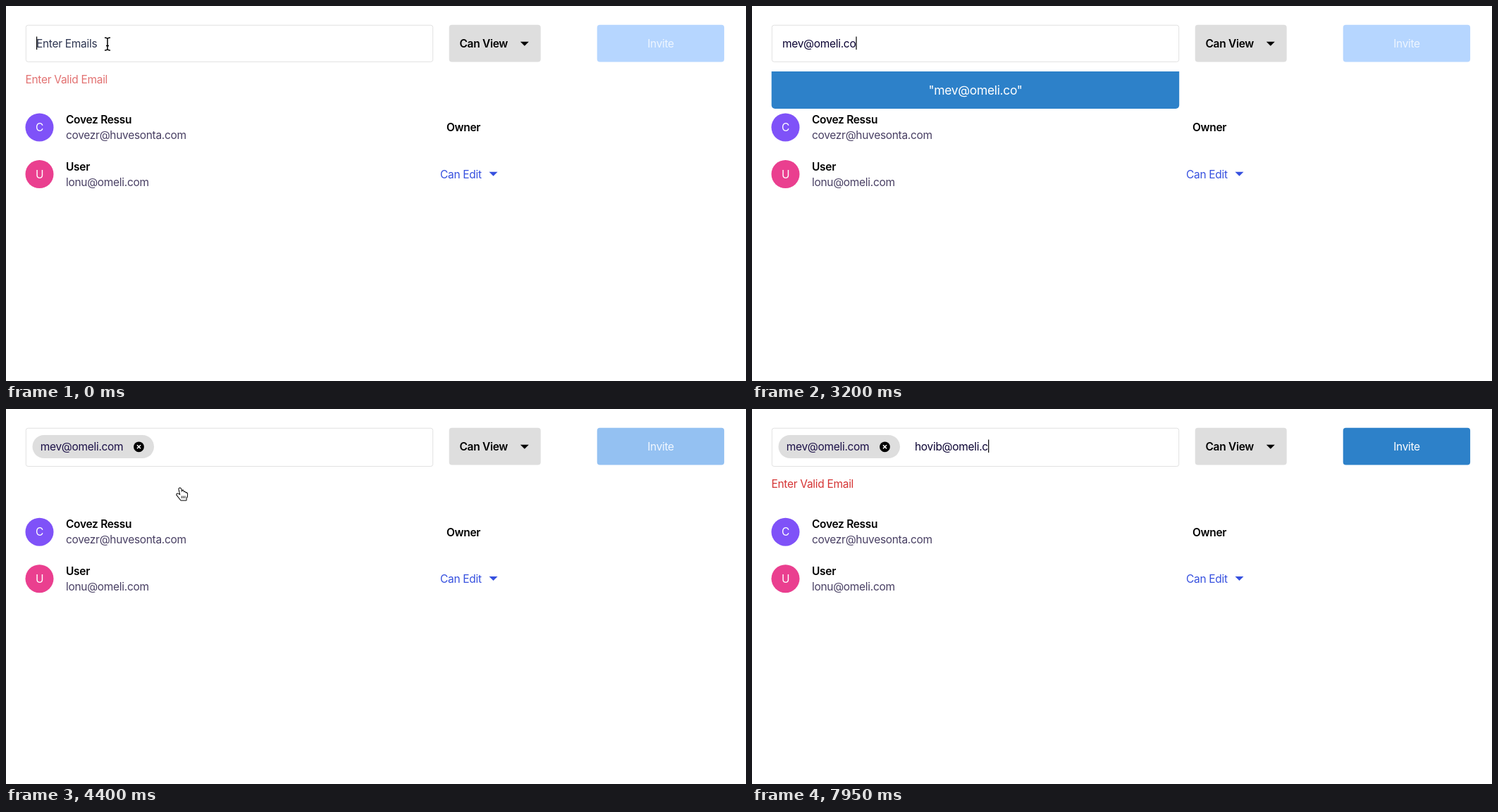
Recreate the animation shown at these times as an HTML page with a canvas. Size 1050x533 px, loop 8 s.

```html
<!DOCTYPE html>
<html lang="en">
<head>
<meta charset="utf-8">
<title>Invite members</title>
<style>
  html, body { margin: 0; width: 100%; height: 100%; overflow: hidden; background: #fff; }
  canvas { display: block; width: 1050px; height: 533px; }
</style>
</head>
<body>
<canvas id="stage"></canvas>
<script>
const W = 1050, H = 533, LOOP = 8000, STEP = 50;
const canvas = document.getElementById('stage');
const ctx = canvas.getContext('2d');
const ratio = window.devicePixelRatio || 1;
canvas.width = W * ratio;
canvas.height = H * ratio;

const FIRST = 'mev@omeli.com', SECOND = 'hovib@omeli.com';
const FIRST_KEYS = [450, 650, 800, 1500, 2000, 2050, 2300, 2450, 2600, 2850, 3100, 3200, 3500];
const SECOND_KEYS = [5350, 5550, 5600, 6000, 6150, 6550, 6650, 7150, 7350, 7500, 7600, 7750, 7950];
const PICK = 4400;   // suggestion becomes a chip
const FOCUS = 4800;  // field is clicked again

// time, x, y of the pointer's hot spot
const PATH = [
  [3850, 150, 56], [3900, 172, 66], [3950, 206, 79], [4000, 230, 91.5],
  [4050, 239, 102], [4100, 244, 109], [4200, 247, 112.5], [4400, 247, 112.5],
  [4500, 256, 103], [4600, 270, 84], [4700, 282, 67], [4800, 288, 59], [4850, 288.5, 58]
];

const ramp = (t, from, to) => t <= from ? 0 : t >= to ? 1 : (t - from) / (to - from);
const mix = (a, b, k) => `rgb(${a.map((v, i) => Math.round(v + (b[i] - v) * k))})`;

function setFont(size, weight) {
  ctx.font = `${weight} ${size}px Inter, "Noto Sans", sans-serif`;
  ctx.letterSpacing = `${-size * 0.0195}px`;
}

// y is the middle of the capitals
function text(str, x, y, color, { size = 15.5, weight = 400, align = 'left' } = {}) {
  setFont(size, weight);
  ctx.textAlign = align;
  ctx.fillStyle = color;
  ctx.fillText(str, x, y + size * 0.36);
}

function textWidth(str) {
  setFont(15.5, 400);
  return ctx.measureText(str).width;
}

function box(x, y, w, h, r, fill, stroke) {
  ctx.beginPath();
  ctx.roundRect(x, y, w, h, r);
  if (fill) { ctx.fillStyle = fill; ctx.fill(); }
  if (stroke) { ctx.strokeStyle = stroke; ctx.lineWidth = 1; ctx.stroke(); }
}

function disc(x, y, r, color) {
  ctx.beginPath();
  ctx.arc(x, y, r, 0, Math.PI * 2);
  ctx.fillStyle = color;
  ctx.fill();
}

function triangle(x, y, color) {
  ctx.beginPath();
  ctx.moveTo(x - 6, y);
  ctx.lineTo(x + 6, y);
  ctx.lineTo(x, y + 6);
  ctx.fillStyle = color;
  ctx.fill();
}

function member(y, name, email, color) {
  disc(47.5, y, 20, color);
  text(name[0], 47.5, y, '#fff', { align: 'center' });
  text(name, 85, y - 11, '#000', { weight: 600 });
  text(email, 85, y + 11, '#483f63');
}

function caret(x, alpha) {
  ctx.globalAlpha = alpha;
  ctx.fillStyle = '#000';
  ctx.fillRect(x, 43.5, 1.2, 18.5);
  ctx.globalAlpha = 1;
}

function outlined(path, fill, edge, width) {
  ctx.lineJoin = 'round';
  ctx.strokeStyle = edge;
  ctx.lineWidth = width;
  ctx.stroke(path);
  ctx.fillStyle = fill;
  ctx.fill(path);
}

const ARROW = new Path2D('M0 0V15.5L3.6 12.2L6.1 18L8.8 16.8L6.3 11.2H11.2Z');
const HAND = new Path2D('M-1.6 1Q-.2-.8 1.2 1L2.7 6Q4-.0 5.2 6Q7 4.3 7.9 6.9Q10 5.9 10.2 8.6' +
  'Q10.4 12.5 8.6 14.6V17H1.2L-4.6 9.6Q-5 7.2-2.4 8.3L.4 10Z');
const BEAM = new Path2D('M-4-9Q-.8-9 0-7.2Q.8-9 4-9M0-7.2V7.2M-4 9Q-.8 9 0 7.2Q.8 9 4 9M-2 2.6H2');

function pointer(kind, x, y, alpha = 1) {
  ctx.save();
  ctx.translate(x, y);
  ctx.globalAlpha = alpha;
  if (kind === 'arrow') outlined(ARROW, '#000', '#fff', 2.2);
  else if (kind === 'hand') {
    outlined(HAND, '#fff', '#000', 2);
    ctx.lineWidth = 0.9;
    ctx.strokeStyle = '#000';
    ctx.stroke(new Path2D('M2.6 11V14.4M4.8 11V14.4M7 11V14.4'));
  } else {
    ctx.strokeStyle = '#fff';
    ctx.lineWidth = 3;
    ctx.stroke(BEAM);
    ctx.strokeStyle = '#000';
    ctx.lineWidth = 1.5;
    ctx.stroke(BEAM);
  }
  ctx.restore();
}

function along(path, t) {
  const i = path.findIndex(p => p[0] > t);
  if (i < 0) return path[path.length - 1].slice(1);
  const [a, b] = [path[i - 1], path[i]];
  const k = ramp(t, a[0], b[0]);
  return [a[1] + (b[1] - a[1]) * k, a[2] + (b[2] - a[2]) * k];
}

function drawPointer(t) {
  if (t < 450) return pointer('beam', 144, 54);
  if (t < PATH[0][0] || t >= 5350) return;
  const [x, y] = along(PATH, t);
  const fieldEnd = t < PICK ? 80 : 82;
  if (y < fieldEnd) pointer('beam', x, y, t < 5300 ? 1 : 0.17);
  else if (t <= PICK && y > 93) pointer('hand', x, y);
  else pointer('arrow', x, y);
}

function drawField(t, picked) {
  box(28.3, 27.3, 577.4, picked ? 54.2 : 52, 3, '#fff', '#e1e1e1');
  const typedBy = keys => keys.filter(k => k <= t).length;
  const ink = '#0b0333';
  if (!picked) {
    const typed = FIRST.slice(0, typedBy(FIRST_KEYS));
    if (typed) text(typed, 43, 53.3, ink);
    else text('Enter Emails', 43, 53.3, '#2d3550');
    const off = (t >= 1400 && t < 1500) || t >= 3950;
    if (!off) caret(43 + textWidth(typed), 1);
    return;
  }
  box(37.5, 37, 172.5, 33, 16.5, '#dedede');
  text(FIRST, 48.7, 53.3, '#1c1148');
  disc(188.5, 53.8, 7.4, '#000');
  ctx.strokeStyle = '#fff';
  ctx.lineWidth = 1.6;
  ctx.stroke(new Path2D('M186 51.3L191 56.3M191 51.3L186 56.3'));
  const typed = SECOND.slice(0, typedBy(SECOND_KEYS));
  if (typed) text(typed, 231, 53.3, ink);
  if (t >= FOCUS) caret(231.2 + textWidth(typed), t >= 5300 && t < 5350 ? 0.15 : 1);
}

function drawSuggestion(t) {
  const typed = FIRST.slice(0, t < 3500 ? -1 : undefined);
  const fill = mix([45, 129, 201], [61, 118, 183], ramp(t, 4000, 4200));
  box(27.7, 93, 578.5, 53, [0, 0, 5, 5], fill);
  text(`"${typed}"`, 317, 119.8, '#fff', { size: 17.5, align: 'center' });
}

function drawError(t, y) {
  const alpha = t < PICK ? 0.7 + 0.3 * ramp(t, 0, 100) : ramp(t, FOCUS - 50, FOCUS + 150);
  ctx.globalAlpha = alpha;
  text('Enter Valid Email', 27.5, y, '#d53434');
  ctx.globalAlpha = 1;
}

function draw(t) {
  const picked = t >= PICK;
  const shift = picked ? 2.2 : 0;
  ctx.setTransform(ratio, 0, 0, ratio, 0, 0);
  ctx.fillStyle = '#fff';
  ctx.fillRect(0, 0, W, H);

  drawField(t, picked);
  box(628.7, 26.8, 130, 52.6, 4, '#dedede');
  text('Can View', 643.5, 53.3, '#000', { weight: 600 });
  triangle(735.8, 50.7, '#000');

  const active = ramp(t, PICK - 50, PICK + 150);
  box(838.7, 26.8, 180.4, 52.8, 4, mix([182, 214, 255], [45, 129, 201], active));
  text('Invite', 929, 53.3, mix([238, 246, 255], [255, 255, 255], active), { align: 'center' });

  member(172.5 + shift, 'Covez Ressu', 'covezr@huvesonta.com', '#7f52f8');
  member(239 + shift, 'User', 'lonu@omeli.com', '#ea3f8f');
  text('Owner', 625, 172.8 + shift, '#000', { weight: 600 });
  text('Can Edit', 616, 239.2 + shift, '#3650df');
  triangle(691.5, 235.7 + shift, '#3650df');

  if (t >= 3200 && !picked) drawSuggestion(t);
  else drawError(t, 104 + shift);
  drawPointer(t);
}

const start = performance.now();
function frame() {
  const t = (performance.now() - start) % LOOP;
  draw(Math.floor(t / STEP) * STEP);
  requestAnimationFrame(frame);
}
frame();
</script>
</body>
</html>
```
